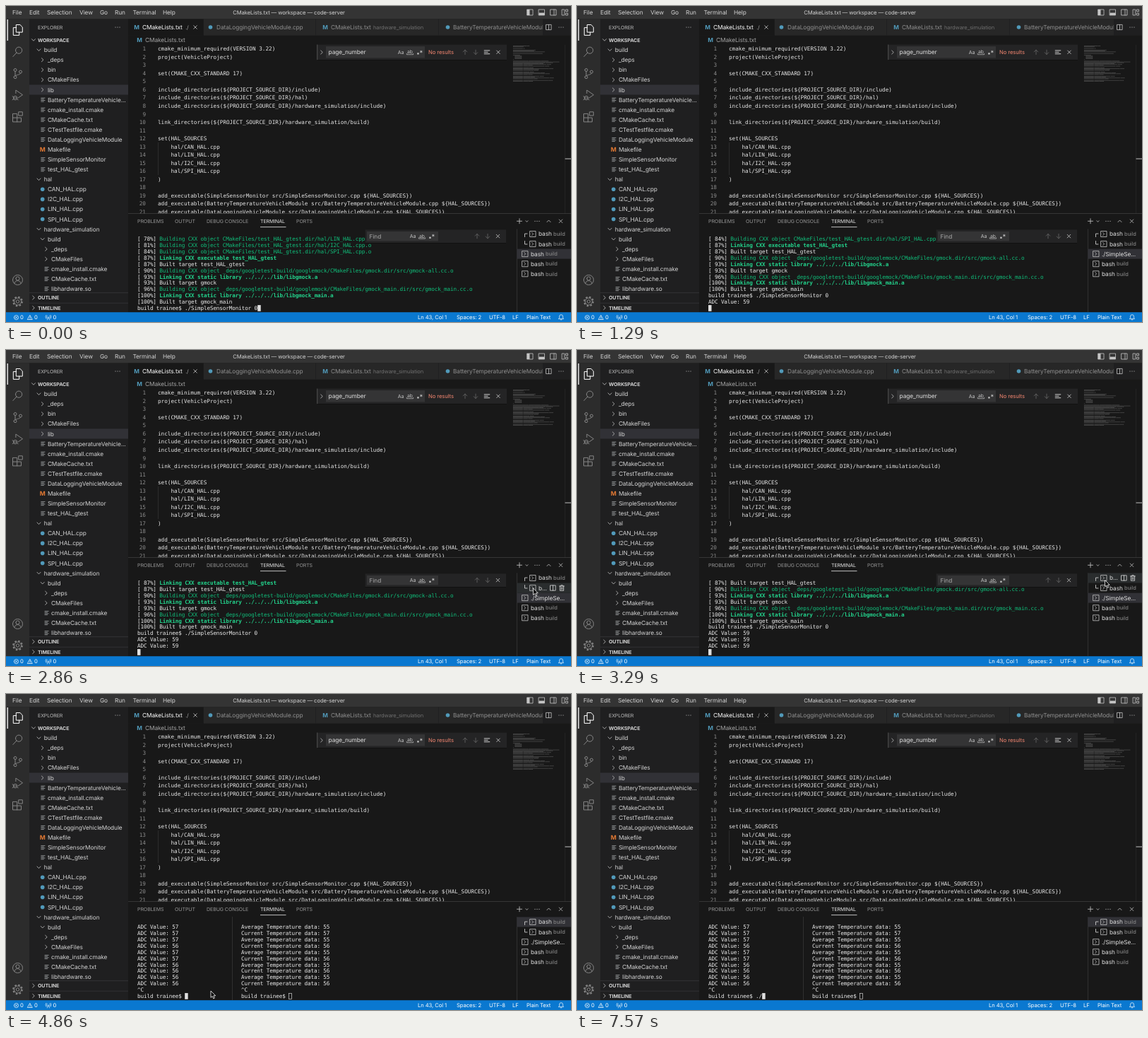
Write an HTML page that moves like this. It is 800x447 px and loops after 8000 ms.

```html
<!DOCTYPE html>
<html lang="en">
<head>
<meta charset="utf-8">
<title>Editor session</title>
<style>
html, body { margin: 0; width: 100%; height: 100%; overflow: hidden; background: #181818; }
svg { display: block; width: 100vw; height: 100vh; }
text { white-space: pre; text-rendering: geometricPrecision; font-family: Inter, Roboto, sans-serif; letter-spacing: -.012em; }
.code, .term { font-family: "DejaVu Sans Mono", "Liberation Mono", monospace; letter-spacing: 0; }
.term { letter-spacing: -.144px; }
</style>
</head>
<body>
<svg id="stage" viewBox="0 0 800 447">
  <g id="base"></g>
  <g id="terminal"></g>
  <g id="tabs"></g>
  <g id="pointer"><path d="M0 0V9.4L2.2 7.4L3.7 10.8L5.3 10.1L3.8 6.8H6.7Z" fill="#000" stroke="#fff" stroke-width=".8"/></g>
</svg>
<script>
const $ = id => document.getElementById(id);
const esc = s => s.replace(/&/g, '&amp;').replace(/</g, '&lt;');
const range = n => [...Array(n).keys()];

const rect = (x, y, w, h, fill, more = '') =>
  `<rect x="${x}" y="${y}" width="${w}" height="${h}" fill="${fill}" ${more}/>`;
const text = (x, cy, s, fill = '#d2d2d2', size = 8.32, more = '') =>
  `<text x="${x}" y="${cy + size * .36}" fill="${fill}" font-size="${size}" ${more}>${esc(s)}</text>`;
const icon = (x, y, d, color = '#c5c5c5', w = .8, fill = 'none') =>
  `<path transform="translate(${x} ${y})" d="${d}" fill="${fill}" stroke="${color}" stroke-width="${w}" stroke-linecap="round"/>`;
const ring = (x, y, r) => `M${x - r} ${y}a${r} ${r} 0 1 0 ${2 * r} 0a${r} ${r} 0 1 0 ${-2 * r} 0`;
const dot = (x, y, r, fill) => `<circle cx="${x}" cy="${y}" r="${r}" fill="${fill}"/>`;
const bold = 'font-weight="700"';

const EDITOR = '#181818', SIDE = '#1f1f20', BAR = '#2c2c2c', WIDGET = '#242425', INPUT = '#343435', PICKED = '#313136';
const BLUE = '#519aba', DIM = '#8e8e8e';

const I = {
  right: 'M-1.3 -2.5L1.3 0L-1.3 2.5',
  down: 'M-2.5 -1.3L0 1.3L2.5 -1.3',
  up: 'M-2.5 1.3L0 -1.3L2.5 1.3',
  lines: 'M-1.9 -2.5h5.2M-1.9 -.8h3.6M-1.9 .9h5.2M-1.9 2.6h3.6',
  close: 'M-2.3 -2.3L2.3 2.3M2.3 -2.3L-2.3 2.3',
  more: 'M-3 0h.01M0 0h.01M3 0h.01',
  plus: 'M-3.5 0h7M0 -3.5v7',
  arrowUp: 'M0 3.2V-3.2M-2.8 -.4L0 -3.2L2.8 -.4',
  arrowDown: 'M0 -3.2V3.2M-2.8 .4L0 3.2L2.8 .4',
  filter: 'M-3.8 -2.4h7.6M-3.8 0h5M-3.8 2.4h7.6',
  split: 'M-3.6 -3.6h7.2v7.2h-7.2zM0 -3.6v7.2',
  shell: 'M-4 -4h8v8h-8zM-1.4 -2L.7 0L-1.4 2',
  trash: 'M-3.4 -2.6h6.8M-1.2 -2.6v-1.2h2.4v1.2M-2.6 -2.6v6.4h5.2v-6.4M-.8 -.8v3M.8 -.8v3',
  files: 'M-1.8 -7.5h5.2l3.4 3.4v7.2h-8.6zM-1.8 -3.4h-4.4v10.8h8.4v-4.3',
  search: ring(1.6, -1.8, 4.6) + 'M-1.6 1.6L-6.6 7',
  branch: ring(-3.5, -5, 2) + ring(-3.5, 5.2, 2) + ring(4, -2.4, 2) + 'M-3.5 -3V3.2M4 -.4C4 2 -1 1.2 -3 3.2',
  debug: 'M-2.6 -3V-7.5L7 -.8L.8 3.4' + ring(-3.4, 3.6, 2.7) + 'M-6 3.6h5.2M-7.4 1.2l1.6 1M-7.4 6.2l1.6 -1M.6 6.2l-1.6 -1',
  blocks: 'M-6.6 -4.6h5.8v5.7h5.8v5.8h-11.6zM-6.6 1.1h5.8v5.8M1.6 -7.2h5.2v5.2h-5.2z',
  account: ring(0, 0, 7) + ring(0, -2, 2.6) + 'M-4.6 5.1a4.6 4 0 0 1 9.2 0',
  bell: 'M-3.4 2.4h6.8L2.5 .8V-1a2.5 2.5 0 0 0 -5 0V.8zM-.8 3.6h1.6'
};

const matchIcons = (x, y) =>
  text(x - 4.3, y, 'Aa', '#c5c5c5', 7) + text(x + 9, y - .6, 'ab', '#c5c5c5', 6.8) +
  icon(x + 13, y + 3, 'M-4.6 -1v1.3h9.2v-1.3', '#c5c5c5', .7) +
  rect(x + 23.3, y + .8, 2.3, 2.3, '#c5c5c5') + text(x + 26.4, y + .6, '*', '#c5c5c5', 8.5, bold);

function findBox(x, y, w, h, inX, inW, label, color, iconX) {
  return rect(x, y + .8, w, h, '#000', 'opacity=".45"') + rect(x, y, w, h, WIDGET) +
    rect(inX, y + 2.5, inW, h - 5.2, INPUT) +
    text(inX + 3.6, y + h / 2, label, color) + matchIcons(iconX, y + h / 2);
}

const TREE = `0d build|1r _deps|1r bin|1r CMakeFiles|1r lib|1f BatteryTemperatureVehicle...|1f cmake_install.cmake|1f CMakeCache.txt|1f CTestTestfile.cmake|1f DataLoggingVehicleModule|1m Makefile|1f SimpleSensorMonitor|1f test_HAL_gtest|0d hal|1c CAN_HAL.cpp|1c I2C_HAL.cpp|1c LIN_HAL.cpp|1c SPI_HAL.cpp|0d hardware_simulation|1d build|2r _deps|2r CMakeFiles|2f cmake_install.cmake|2f CMakeCache.txt|2f libhardware.so`.split('|');

const CODE = `cmake_minimum_required(VERSION 3.22)
project(VehicleProject)

set(CMAKE_CXX_STANDARD 17)

include_directories(\${PROJECT_SOURCE_DIR}/include)
include_directories(\${PROJECT_SOURCE_DIR}/hal)
include_directories(\${PROJECT_SOURCE_DIR}/hardware_simulation/include)

link_directories(\${PROJECT_SOURCE_DIR}/hardware_simulation/build)

set(HAL_SOURCES
    hal/CAN_HAL.cpp
    hal/LIN_HAL.cpp
    hal/I2C_HAL.cpp
    hal/SPI_HAL.cpp
)

add_executable(SimpleSensorMonitor src/SimpleSensorMonitor.cpp \${HAL_SOURCES})
add_executable(BatteryTemperatureVehicleModule src/BatteryTemperatureVehicleModule.cpp \${HAL_SOURCES})
add_executable(DataLoggingVehicleModule src/DataLoggingVehicleModule.cpp \${HAL_SOURCES})`.split('\n');

function titleBar() {
  const menu = [['File', 9], ['Edit', 33], ['Selection', 58], ['View', 104], ['Go', 133], ['Run', 154], ['Terminal', 179.5], ['Help', 222]];
  const frame = 'M-4 -4h8v8h-8z';
  return rect(0, 0, 800, 18.6, '#343434') +
    menu.map(([s, x]) => text(x, 9.3, s)).join('') +
    text(400.5, 9.3, 'CMakeLists.txt — workspace — code-server', '#d2d2d2', 7.68, 'text-anchor="middle"') +
    icon(742, 9, frame) + rect(738, 5, 3.5, 8, '#c5c5c5') +
    icon(758.5, 9, frame) + rect(754.5, 9.6, 8, 3.4, '#c5c5c5') +
    icon(775, 9, frame + 'M1 -4v8') +
    icon(791.5, 9, 'M-4 -4h3.2v8h-3.2zM1.4 -4h2.6v2.8h-2.6zM1.4 1.2h2.6v2.8h-2.6z');
}

function activityBar() {
  const items = [['search', 64.5], ['branch', 95.5], ['debug', 126.5], ['blocks', 157], ['account', 387.5]];
  return rect(0, 18.6, 33, 416, BAR) + rect(1.6, 19, 1.3, 30, '#fff') +
    icon(16.5, 34, I.files, '#fff', 1) +
    items.map(([k, y]) => icon(16.5, y, I[k], '#858585', 1)).join('') +
    icon(16.5, 418, ring(0, 0, 2.2) + ring(0, 0, 5), '#858585', 1) +
    `<circle cx="16.5" cy="418" r="6.3" fill="none" stroke="#858585" stroke-width="2" stroke-dasharray="2.47"/>`;
}

function sideBar() {
  let s = rect(33, 18.6, 140, 416, SIDE) + text(45, 30, 'EXPLORER', '#bbb', 7.04) +
    icon(158, 30, I.more, '#ccc', 1.2) + icon(39, 48, I.down) + text(45, 48, 'WORKSPACE', '#d2d2d2', 7.04, bold) +
    rect(33, 111.4, 140, 14.1, PICKED);
  TREE.forEach((row, i) => {
    const depth = +row[0], kind = row[1], y = 62.2 + 14.08 * i, x = 46.5 + 5.2 * depth;
    if (kind == 'd') s += icon(x, y, I.down);
    if (kind == 'r') s += icon(x, y, I.right);
    if (kind == 'f') s += icon(x, y, I.lines, '#b5b9ba', .7);
    if (kind == 'c') s += dot(x, y, 2.8, BLUE);
    if (kind == 'm') s += text(x - 4, y, 'M', '#e37933', 8.6, bold);
    s += text(x + 7.2, y, row.slice(3));
  });
  [['OUTLINE', 412.6], ['TIMELINE', 427]].forEach(([label, y]) => {
    s += rect(33, y - 7.2, 140, 14.4, SIDE) + rect(33, y - 7.2, 140, .7, '#3a3a3c') +
      icon(39, y, I.right) + text(45, y, label, '#d2d2d2', 7.04, bold);
  });
  return s;
}

function editorTabs() {
  const m = (x, y) => text(x - 3.8, y, 'M', BLUE, 8.2, bold);
  return rect(173, 18.6, 627, 23, SIDE) + rect(280, 18.6, 480, 23, '#272727') + rect(173, 18.6, 106.5, 23, EDITOR) +
    rect(438, 18.6, .7, 23, SIDE) + rect(612, 18.6, .7, 23, SIDE) +
    m(185, 30) + text(193, 30, 'CMakeLists.txt', '#fff') + text(254, 30, './', '#aaa', 7.4) + icon(268, 30, I.close) +
    dot(289.5, 30, 2.8, BLUE) + text(298, 30, 'DataLoggingVehicleModule.cpp', DIM) +
    m(452, 30) + text(460, 30, 'CMakeLists.txt', DIM) + text(520, 30.3, 'hardware_simulation', '#6e6e6e', 7.5) +
    dot(625.5, 30, 2.8, BLUE) + text(633, 30, 'BatteryTemperatureVehicleModule.cpp', DIM) +
    rect(760, 18.6, 40, 23, SIDE) + icon(768.5, 30, I.split) + icon(786, 30, I.more, '#ccc', 1.2) +
    m(189, 48) + text(197, 48, 'CMakeLists.txt', '#a5a5a5');
}

function miniMap() {
  const tail = range(22).map(i => i % 5 == 4 ? '' : 'target_link_libraries( ' + 'x'.repeat(34 + 24 * Math.sin(i * 2.3)) + ' hardware)');
  let d = '';
  CODE.concat(tail).forEach((line, i) => {
    for (const w of line.matchAll(/\S+/g)) d += `M${718 + w.index * .64} ${56.5 + i * 1.19}h${w[0].length * .64}`;
  });
  return `<path d="${d}" stroke="#aaa" stroke-width=".7" stroke-dasharray="1.6 .4" opacity=".5"/>`;
}

function editor() {
  return CODE.map((line, i) => {
    const y = 60.6 + 11.52 * i;
    return text(198, y, String(i + 1), '#8c8c8c', 7.68, 'class="code" text-anchor="end"') +
      text(215, y, line, '#e6e6e6', 7.68, 'class="code"');
  }).join('') + rect(215.3, 193, .6, 46, '#3c3c3c') + miniMap() +
    rect(791, 55, .6, 239, '#2c2c2c') + rect(791.5, 215.4, 8.5, 1.5, '#8a8a8a') +
    findBox(440, 54.6, 269, 21.6, 453, 140, 'page_number', '#ddd', 559) + rect(440, 54.6, 1.3, 21.6, '#454545') +
    icon(447, 65.5, I.right) + text(598, 65.6, 'No results', '#f48771', 7.68) +
    icon(650, 65.3, I.arrowUp, '#6a6a6a') + icon(665, 65.3, I.arrowDown, '#6a6a6a') +
    icon(681, 65.3, I.filter, '#d0d0d0', 1) + icon(697, 65.3, I.close, '#d0d0d0');
}

function panel() {
  const names = [['PROBLEMS', 186], ['OUTPUT', 239], ['DEBUG CONSOLE', 284], ['TERMINAL', 360], ['PORTS', 411]];
  return rect(173, 293.6, 627, 141, EDITOR) + rect(173, 293.3, 627, .7, '#434343') +
    names.map(([s, x]) => text(x, 304.6, s, x == 360 ? '#e7e7e7' : '#969696', 7.04)).join('') +
    rect(360, 312.3, 36.5, .8, '#e7e7e7') +
    icon(727, 304.3, I.plus, '#ccc') + icon(737.5, 304.6, 'M-1.5 -.8L0 .8L1.5 -.8') +
    icon(752, 304.3, I.more, '#ccc', 1.2) + icon(768.5, 304.3, I.up) + icon(785.5, 304.3, I.close);
}

function statusBar() {
  const items = [['0', 20], ['0', 40], ['0', 66.5], ['Ln 43, Col 1', 583], ['Spaces: 2', 638], ['UTF-8', 684], ['LF', 717], ['Plain Text', 737]];
  return rect(0, 433.2, 800, 13.8, '#0a78d0') +
    icon(14.5, 440.6, ring(0, 0, 3.1) + 'M-1.2 -1.2L1.2 1.2M1.2 -1.2L-1.2 1.2', '#fff', .7) +
    icon(34, 440.6, 'M0 -3L3.3 2.9H-3.3zM0 -.9v1.6M0 1.8v.1', '#fff', .7) +
    icon(60, 440.6, 'M0 -.6L-1.6 3.4M0 -.6L1.6 3.4M-1.8 -2.6a2.6 2.6 0 0 0 0 3.6M1.8 -2.6a2.6 2.6 0 0 1 0 3.6M-3.2 -3.4a4 4 0 0 0 0 5M3.2 -3.4a4 4 0 0 1 0 5', '#fff', .6) +
    items.map(([s, x]) => text(x, 440.6, s, '#fff', 7.68)).join('') + icon(786, 440.2, I.bell, '#fff', .7);
}

$('base').innerHTML = rect(0, 0, 800, 447, EDITOR) + titleBar() + activityBar() + sideBar() +
  editorTabs() + editor() + panel() + statusBar();

// Times of the scripted actions, in ms
const LOOP = 8000, ENTER = 1000, FIRST = 1140, RENAME = 1290, PICK = 3570, FOCUS = 4710, DOT = 6000, SLASH = 6710;

const PROMPT = 'build trainee$ ';
const MOCK = '_deps/googletest-build/googlemock/CMakeFiles/';
const hal = (p, f) => `[ ${p}%] Building CXX object CMakeFiles/test_HAL_gtest.dir/hal/${f}_HAL.cpp.o`;
const LOG = [
  hal(78, 'LIN'), hal(81, 'I2C'), hal(84, 'SPI'),
  '[ 87%] Linking CXX executable test_HAL_gtest',
  '[ 87%] Built target test_HAL_gtest',
  `[ 90%] Building CXX object ${MOCK}gmock.dir/src/gmock-all.cc.o`,
  '[ 93%] Linking CXX static library ../../../lib/libgmock.a',
  '[ 93%] Built target gmock',
  `[ 96%] Building CXX object ${MOCK}gmock_main.dir/src/gmock_main.cc.o`,
  '[100%] Linking CXX static library ../../../lib/libgmock_main.a',
  '[100%] Built target gmock_main',
  PROMPT + './SimpleSensorMonitor 0'
];
const ADC = [57, 57, 57, 56, 57, 57, 56, 56, 56, 56].map(v => 'ADC Value: ' + v);
const TEMP = range(10).map(i => i % 2 ? `Current Temperature data: ${i == 1 ? 57 : 56}` : 'Average Temperature data: 55');

const CELL = 4.48;
function termLine(x, y, line) {
  const put = (x, s, c, more = '') => text(x, y, s, c, 7.68, `class="term" ${more}`);
  const work = /Building|Linking/.exec(line);
  if (!work) return put(x, line, '#ececec');
  const link = work[0] == 'Linking';
  return put(x, line.slice(0, 7), '#ececec') +
    put(x + 7 * CELL, line.slice(7), link ? '#23d18b' : '#10bf7b', link ? bold : '');
}
function pane(x, lines, solid) {
  const rows = lines.slice(-12), last = rows.length - 1;
  const cx = x + rows[last].length * CELL, cy = 329 + last * 8.96 - 4.5;
  return rows.map((line, i) => termLine(x, 329 + i * 8.96, line)).join('') +
    (solid ? rect(cx, cy, CELL, 8.7, '#e0e0e0') : rect(cx + .3, cy + .3, CELL - .6, 8.1, 'none', 'stroke="#d0d0d0" stroke-width=".7"'));
}

function terminal(t) {
  if (t < PICK) {
    const lines = [...LOG];
    if (t >= ENTER) {
      const count = t < FIRST ? 0 : 1 + Math.floor((t - FIRST) / 1000);
      lines.push(...Array(count).fill('ADC Value: 59'), '');
    }
    return pane(186, lines, true) +
      findBox(508.5, 316.5, 199.5, 18.6, 511, 101, 'Find', '#a6a6a6', 576) +
      icon(667, 325.6, I.arrowUp, '#6a6a6a') + icon(682, 325.6, I.arrowDown, '#6a6a6a') + icon(696.5, 325.6, I.close, '#d0d0d0');
  }
  const typed = (t >= DOT ? '.' : '') + (t >= SLASH ? '/' : '');
  return rect(320, 315, .7, 118, '#3c3c3c') +
    pane(186, [...ADC, '^C', PROMPT + typed], t >= FOCUS) + pane(333, [...TEMP, '^C', PROMPT], false);
}

function shellList(t, hover) {
  const picked = t < PICK ? 2 : 0, listFocus = t >= PICK && t < FOCUS;
  let s = rect(723, 315.4, .7, 117.8, '#3c3c3c');
  range(5).forEach(i => {
    const y = 322.5 + 14.08 * i, top = y - 7, child = i < 2;
    const sel = i == picked, tools = i == hover || (sel && listFocus);
    if (sel && listFocus) s += rect(723.6, top + .4, 76.4, 13.2, '#04395e', 'stroke="#0a78d0" stroke-width=".7"');
    else if (sel) s += rect(723.6, top, 76.4, 14, PICKED);
    else if (i == hover) s += rect(723.6, top, 76.4, 14, '#2a2d2e');
    if (child) s += icon(736, y, i ? 'M-1.5 -4V.4H2' : 'M-1.5 4V-.4H2', '#ccc', .9);
    const x = child ? 746 : 735;
    const running = i == 2 && t >= RENAME;
    s += icon(x, y, I.shell);
    if (tools) {
      s += text(x + 8, y, child ? 'b...' : running ? './Sim...' : 'bash', '#ddd') +
        icon(774.5, y, I.split, '#ddd') + icon(787, y, I.trash, '#ddd');
    } else if (running) s += text(x + 8, y, './SimpleSe...', '#ddd');
    else s += text(x + 8, y, 'bash', '#ddd') + text(x + 29, y, 'build', DIM, 7.5);
  });
  return s;
}

const PATH = [
  [2000, 741, 430], [2140, 741, 402.5], [2430, 741, 402.5], [3000, 747.5, 325.5], [PICK, 747.5, 325.5],
  [3930, 429.5, 417], [4250, 429.5, 417], [4650, 290, 420], [DOT, 290, 420]
];
function pointerAt(t) {
  const i = PATH.findIndex(k => k[0] > t);
  if (i < 1) return null;
  const [a, b] = [PATH[i - 1], PATH[i]];
  const p = (t - a[0]) / (b[0] - a[0]), e = p * p * (3 - 2 * p);
  return [a[1] + (b[1] - a[1]) * e, a[2] + (b[2] - a[2]) * e];
}

const shown = {};
function show(id, html) {
  if (shown[id] !== html) $(id).innerHTML = shown[id] = html;
}

function frame() {
  const t = performance.now() % LOOP, p = pointerAt(t);
  const hover = p && p[0] > 723 ? Math.floor((p[1] - 315.5) / 14.08) : -1;
  show('terminal', terminal(t));
  show('tabs', shellList(t, hover));
  $('pointer').setAttribute('visibility', p ? 'visible' : 'hidden');
  if (p) $('pointer').setAttribute('transform', `translate(${p[0]} ${p[1]})`);
  requestAnimationFrame(frame);
}
frame();
</script>
</body>
</html>
```
